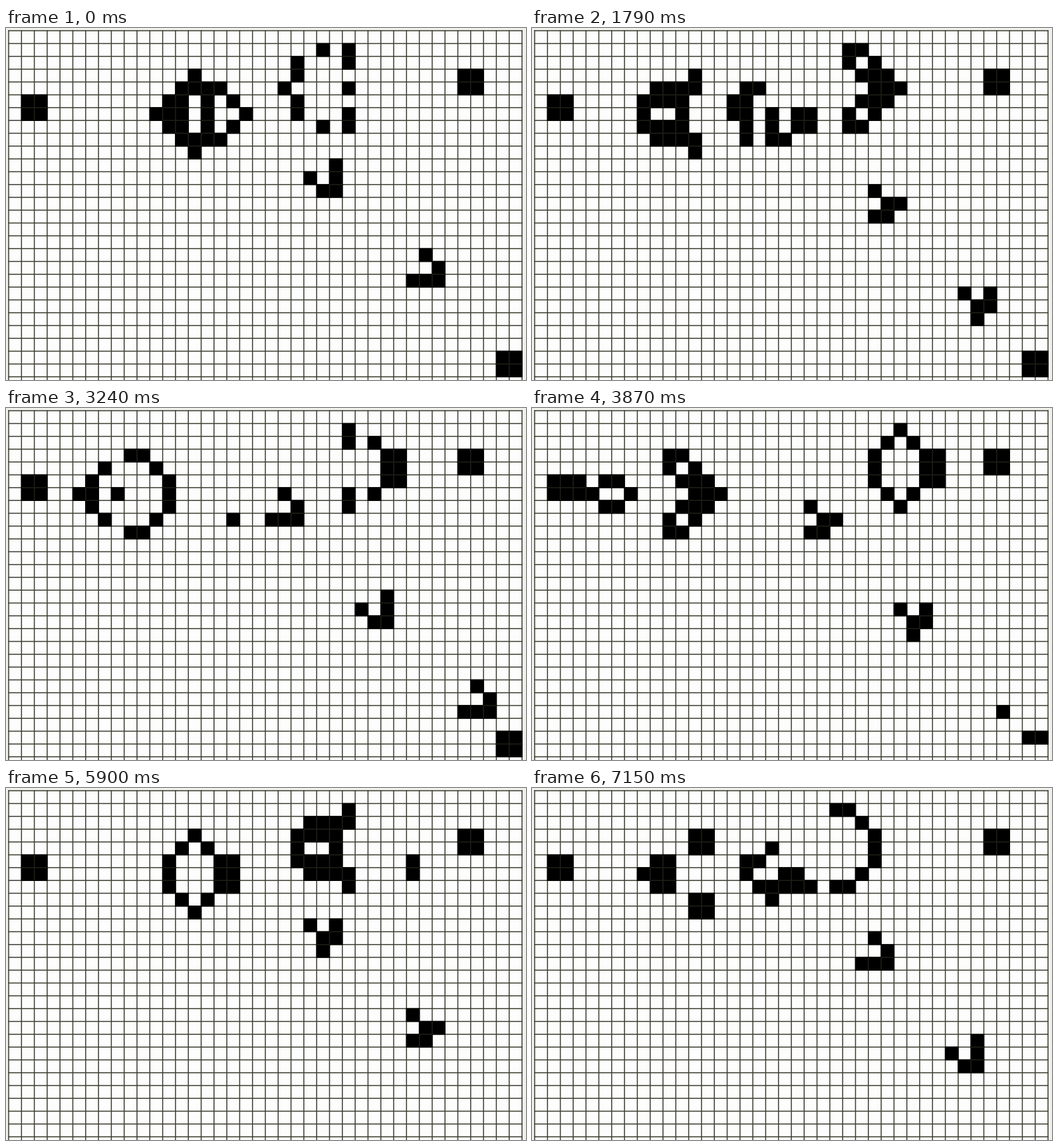
These frames come from a looping animation (782x530 px, 7.2 s). An HTML page with a canvas:

```html
<!DOCTYPE html>
<html lang="en">
<head>
<meta charset="utf-8">
<title>Glider gun</title>
<style>
  html, body { margin: 0; width: 782px; height: 530px; overflow: hidden; background: #f0f0ec; }
  canvas { display: block; }
</style>
</head>
<body>
<canvas id="stage" width="782" height="530"></canvas>
<script>
const ctx = document.getElementById('stage').getContext('2d');

const LOOP = 7200, TICKS = 149, GENS = 37;
const COLS = 40, ROWS = 28, PITCH = 19.3, LINE = 1.5;
const PAD = 6, W = COLS + 2 * PAD, H = ROWS + 2 * PAD;
const at = (x, y) => (y + PAD) * W + x + PAD;

// Each part: left column, top row, then its rows.
const parts = [
  [1, 5, 'OO/OO'],
  [11, 3, '...O/..OOOO/.OO.O.O/OOO.O..O/.OO.O.O/..OOOO/...O'],
  [21, 1, '...O.O/.O...O/.O/O....O/.O/.O...O/...O.O'],
  [35, 3, 'OO/OO'],
  [23, 10, '..O/O.O/.OO'],
  [31, 17, '.O./..O/OOO'],
  [38, 25, 'OO/OO']
];

function seed() {
  const world = new Uint8Array(W * H);
  for (const [x, y, shape] of parts)
    shape.split('/').forEach((row, j) =>
      [...row].forEach((ch, i) => { if (ch === 'O') world[at(x + i, y + j)] = 1; }));
  return world;
}

function evolve(world) {
  const next = new Uint8Array(W * H);
  for (let y = 1; y < H - 1; y++)
    for (let x = 1; x < W - 1; x++) {
      const p = y * W + x;
      let n = -world[p];
      for (let dy = -W; dy <= W; dy += W)
        n += world[p + dy - 1] + world[p + dy] + world[p + dy + 1];
      next[p] = n === 3 || (n === 2 && world[p]) ? 1 : 0;
    }
  return next;
}

const history = [seed()];
while (history.length < GENS) history.push(evolve(history[history.length - 1]));

// Centres of the grid lines; fractional places give soft edges.
const lineX = i => 4 + PITCH * i;
const lineY = j => 4.1 + PITCH * j;

function box(x, y, w, h, color) {
  ctx.fillStyle = color;
  ctx.fillRect(x, y, w, h);
}

function draw(world) {
  const half = LINE / 2, left = lineX(0), top = lineY(0);
  const width = COLS * PITCH, height = ROWS * PITCH;
  box(0, 0, 782, 530, '#f0f0ec');
  box(left, top, width, height, '#fdfdfd');
  for (let i = 0; i <= COLS; i++) box(lineX(i) - half, top - half, LINE, height, '#3c3c30');
  for (let j = 0; j < ROWS; j++) box(left - half, lineY(j) - half, width + LINE, LINE, '#3c3c30');

  const alive = (x, y) => world[at(x, y)];
  const cells = [];
  for (let y = 0; y < ROWS; y++)
    for (let x = 0; x < COLS; x++)
      if (alive(x, y)) cells.push([x, y]);

  for (const [x, y] of cells)
    box(lineX(x) - half, lineY(y) - half, PITCH + LINE, PITCH + LINE, '#000');
  // Faint grid shows between touching cells.
  for (const [x, y] of cells) {
    if (alive(x - 1, y)) box(lineX(x) - half, lineY(y), LINE, PITCH, '#202018');
    if (alive(x, y - 1)) box(lineX(x), lineY(y) - half, PITCH, LINE, '#202018');
  }
}

let start = null, shown = -1;
function frame(now) {
  if (start === null) start = now;
  const t = (now - start) % LOOP;
  const tick = Math.min(TICKS - 1, Math.floor((t + 5) * TICKS / LOOP));
  const gen = Math.min(GENS - 1, Math.floor(tick * 0.2428 + 0.28));
  if (gen !== shown) {
    shown = gen;
    draw(history[gen]);
  }
  requestAnimationFrame(frame);
}
draw(history[0]);
requestAnimationFrame(frame);
</script>
</body>
</html>
```
